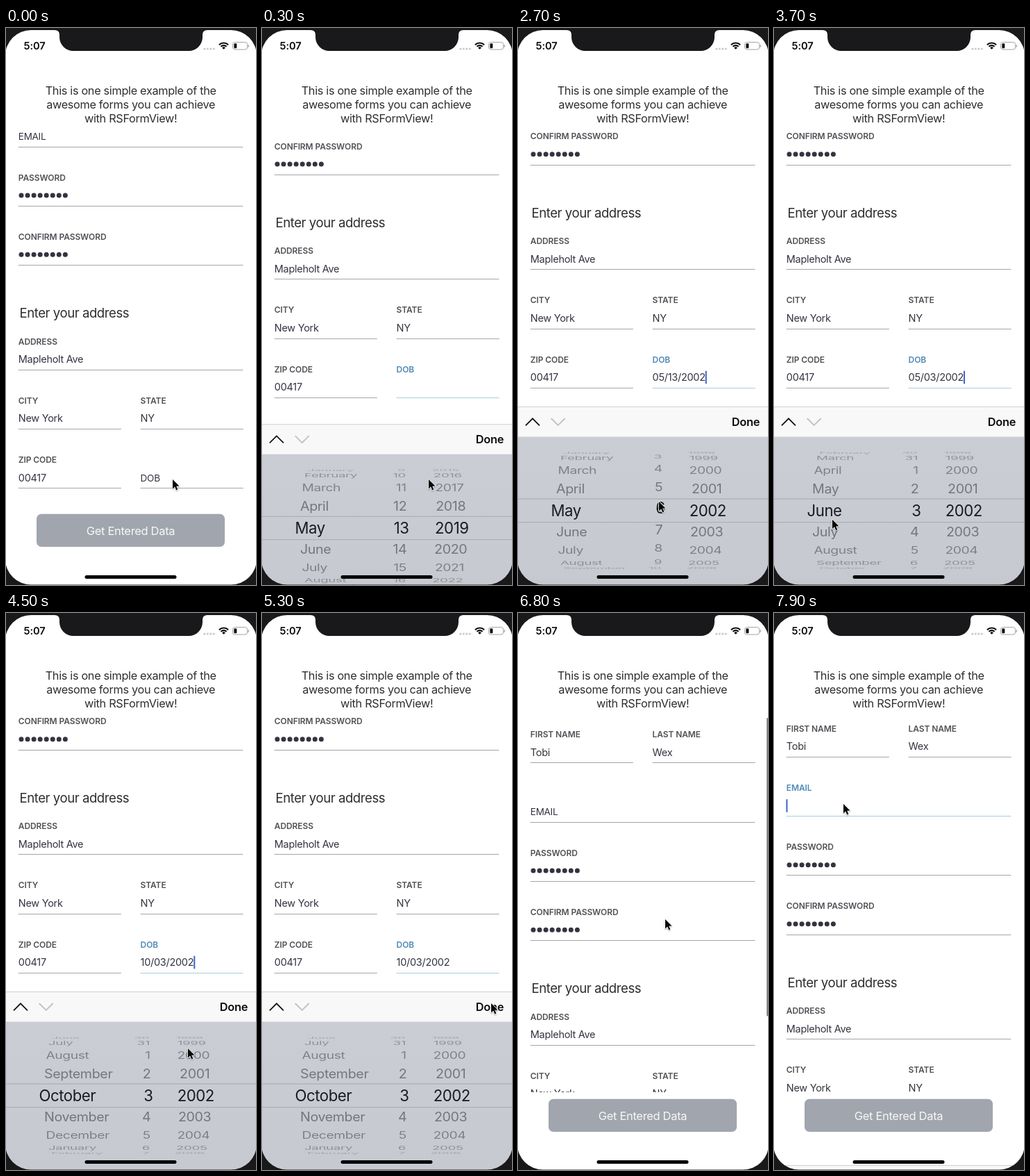
An HTML page with a canvas that plays this animation: 360 by 802 pixels, repeating every 8000 ms.

```html
<!DOCTYPE html>
<html lang="en">
<head>
<meta charset="utf-8">
<title>Form with date picker</title>
<style>
html, body { margin: 0; width: 100%; height: 100%; overflow: hidden; background: #fff; }
canvas { display: block; width: 360px; height: 802px; }
</style>
</head>
<body>
<canvas id="stage"></canvas>
<script>
const W = 360, H = 802, LOOP = 8000, STEP = 100;
const canvas = document.getElementById('stage');
const ctx = canvas.getContext('2d');
const dpr = window.devicePixelRatio || 1;
canvas.width = W * dpr;
canvas.height = H * dpr;

const INK = '#33343f', LABEL = '#515157', BLUE = '#4f8ab8', BEZEL = '#19191b';
const MONTHS = ['January', 'February', 'March', 'April', 'May', 'June', 'July',
  'August', 'September', 'October', 'November', 'December'];

// Times of the main actions
const DOB_FOCUS = 86, DOB_DONE = 5405, SCROLL_BACK = 6200, EMAIL_FOCUS = 7886;
const SPIN = 700, GLIDE = 400;
const FLICKS = {
  year: { at: 987, from: 2019, to: 2002 },
  day: { at: 2475, from: 13, to: 3 },
  month: { at: 3650, from: 5, to: 10 }
};

// Stops of the pointer: arrival time, x, y
const STOPS = [
  [0, 240, 650], [800, 273, 642], [1200, 295, 728], [2400, 190, 642], [2700, 203, 682],
  [3500, 82, 740], [3950, 88, 638], [4500, 262, 627], [5000, 330, 562],
  [5800, 205, 404], [6800, 212, 441], [7500, 100, 275]];

const clamp = v => Math.min(1, Math.max(0, v));
const smooth = u => u * u * (3 - 2 * u);
const wrap = (k, n) => ((k % n) + n) % n;
const two = n => String(n).padStart(2, '0');

// Critically damped spring, 0 to 1
function spring(ms) {
  if (ms <= 0) return 0;
  const w = ms * 0.0183;
  return 1 - (1 + w) * Math.exp(-w);
}

// Underdamped swing, 1 to 0, with one visible overshoot after 600 ms
function bounce(ms) {
  if (ms <= 0) return 1;
  const w = Math.PI * ms / 600, k = 0.847;
  return Math.exp(-k * w) * (Math.cos(w) + k * Math.sin(w));
}

function spun({ at, from, to }, t) {
  return to + (from - to) * (1 - clamp((t - at) / SPIN)) ** 3;
}

function settled({ at, from, to }, t) {
  return t >= at + SPIN ? to : from;
}

function dobText(t) {
  const { year, month, day } = FLICKS;
  if (t < year.at + SPIN) return '';
  return `${two(settled(month, t))}/${two(settled(day, t))}/${settled(year, t)}`;
}

function pointerAt(t) {
  let [last, x, y] = STOPS[0];
  for (const [arrive, nx, ny] of STOPS.slice(1)) {
    const leave = Math.max(last, arrive - GLIDE);
    const u = smooth(clamp((t - leave) / (arrive - leave)));
    x += (nx - x) * u;
    y += (ny - y) * u;
    last = arrive;
  }
  return [x, y];
}

function text(str, x, y, size, color, { weight = 400, align = 'left', track = -0.02 } = {}) {
  ctx.font = `${weight} ${size}px Inter, "Liberation Sans", sans-serif`;
  ctx.letterSpacing = `${track * size}px`;
  ctx.textAlign = align;
  ctx.fillStyle = color;
  ctx.fillText(str, x, y + size * 0.36);
}

function rect(x, y, w, h, color, r = 0) {
  ctx.fillStyle = color;
  ctx.beginPath();
  ctx.roundRect(x, y, w, h, r);
  ctx.fill();
}

function dot(x, y, r, color) {
  ctx.fillStyle = color;
  ctx.beginPath();
  ctx.arc(x, y, r, 0, Math.PI * 2);
  ctx.fill();
}

function chevron(x, y, rise, color) {
  ctx.strokeStyle = color;
  ctx.lineWidth = 1.8;
  ctx.beginPath();
  ctx.moveTo(x - 10, y);
  ctx.lineTo(x, y - rise);
  ctx.lineTo(x + 10, y);
  ctx.stroke();
}

function clipRects(...boxes) {
  ctx.beginPath();
  for (const box of boxes) ctx.rect(...box);
  ctx.clip();
}

function field(label, value, x, y, w, focus = false, caret = false) {
  const mid = y + 25.7;
  if (value || focus) {
    text(label, x, y, 12, focus ? BLUE : LABEL, { weight: 600, track: -0.008 });
  } else {
    text(label, x, mid + 0.5, 13.5, INK);
  }
  if (value === '*') {
    for (let i = 0; i < 8; i++) dot(x + 4.2 + i * 9.05, mid, 3.5, INK);
  } else {
    text(value, x, mid, 14.5, INK);
  }
  if (caret) {
    const end = value ? ctx.measureText(value).width : -0.3;
    rect(x + end, mid - 9.2, 2, 18.5, '#3c62cf');
  }
  rect(x, Math.round(y + 40.5), w, 1, focus ? '#a6cddd' : '#a5a5a9');
}

function drawForm(t, scroll) {
  const blink = wrap(t - 450, 1000) < 500;
  const dob = t >= DOB_FOCUS && t < DOB_DONE;
  const email = t >= EMAIL_FOCUS;
  const half = 148, full = 323.5, left = 17.8, right = 193.6;
  const row = i => 166.5 + i * 85.2 - scroll;
  const lower = i => 572.8 + i * 85.2 - scroll;
  ctx.save();
  clipRects([0, 149.5, W, 540.5]);
  field('FIRST NAME', 'Tobi', left, row(0), half);
  field('LAST NAME', 'Wex', right, row(0), half);
  field('EMAIL', '', left, row(1), full, email, email);
  field('PASSWORD', '*', left, row(2), full);
  field('CONFIRM PASSWORD', '*', left, row(3), full);
  text('Enter your address', 19.5, 532.2 - scroll, 18.6, '#2e2e32', { track: -0.025 });
  field('ADDRESS', 'Mapleholt Ave', left, lower(0), full);
  field('CITY', 'New York', left, lower(1), half);
  field('STATE', 'NY', right, lower(1), half);
  field('ZIP CODE', '00417', left, lower(2), half);
  field('DOB', dobText(t), right, lower(2), half, dob, dob && blink);
  ctx.globalAlpha = clamp(Math.min((t - SCROLL_BACK) / 100, (7500 - t) / 400));
  rect(358, 151 + Math.max(0, scroll) * 0.82, 2, 438 + Math.min(0, scroll), '#858587', 1);
  ctx.restore();
}

// One pass over the rows of a rotating column
function wheelRows(name, pos, x, align, picked) {
  const mid = Math.round(pos);
  for (let k = mid - 4; k <= mid + 4; k++) {
    const a = (k - pos) * 0.382;
    if (Math.abs(a) > 1.56) continue;
    const c = Math.cos(a), near = 1 - 0.092 * (1 - c);
    const color = picked ? '#1b1b1e' : `rgba(0,0,0,${0.18 + 0.26 * c})`;
    ctx.save();
    ctx.translate(180, 694.7 + 83 * Math.sin(a));
    ctx.scale(near, near * Math.max(c, 0.18));
    text(name(k), x, 0, picked ? 22.2 : 19.8, color, { align });
    ctx.restore();
  }
}

function wheel(name, pos, x, pickedX, align) {
  ctx.save();
  clipRects([0, 588, W, 90], [0, 711.5, W, 92]);
  wheelRows(name, pos, x, align, false);
  ctx.restore();
  ctx.save();
  clipRects([0, 678, W, 33.5]);
  wheelRows(name, pos, pickedX, align, true);
  ctx.restore();
}

function drawPicker(t, shown) {
  if (shown < 0.001) return;
  ctx.save();
  ctx.translate(0, (1 - shown) * (H - 545));
  rect(0, 545, W, 44, '#f8f8f8');
  rect(0, 545, W, 1, '#cfcfd1');
  chevron(21, 572.3, 10, '#111');
  chevron(57.7, 562, -10, '#c2c2c5');
  text('Done', 348.3, 567.3, 16.3, '#0c0c0c', { weight: 600, align: 'right', track: -0.01 });
  const shade = ctx.createLinearGradient(0, 589, 0, H);
  shade.addColorStop(0, '#cbcdd5');
  shade.addColorStop(1, '#c7c9d1');
  rect(0, 588.5, W, 214, shade);
  wheel(k => MONTHS[wrap(k - 1, 12)], spun(FLICKS.month, t), -125.8, -132.5, 'left');
  wheel(k => String(wrap(k - 1, 31) + 1), spun(FLICKS.day, t), 28.5, 31.5, 'right');
  wheel(String, spun(FLICKS.year, t), 92.3, 93.3, 'center');
  rect(0, 677.5, W, 1, '#a6a8af');
  rect(0, 711.2, W, 1, '#a6a8af');
  ctx.restore();
}

function drawStatus() {
  const black = '#0b0b0b', gray = '#a3a3a5';
  text('5:07', 25.6, 25.8, 14.7, black, { weight: 600, track: -0.01 });
  for (let i = 0; i < 4; i++) dot(285.8 + i * 4.5, 30, 1.6, '#c9c9cb');
  ctx.strokeStyle = black;
  for (const [r, width] of [[9.3, 2.2], [5.7, 2.2], [1.7, 3.4]]) {
    ctx.lineWidth = width;
    ctx.beginPath();
    ctx.arc(313.5, 30.8, r, Math.PI * 1.25, Math.PI * 1.75);
    ctx.stroke();
  }
  ctx.strokeStyle = gray;
  ctx.lineWidth = 1;
  ctx.beginPath();
  ctx.roundRect(326.5, 20.5, 21, 10.5, 3);
  ctx.stroke();
  rect(328.3, 22.2, 4, 7.1, black, 1.2);
  rect(348.6, 24, 1.4, 3.8, gray, 0.7);
}

function drawBezel() {
  ctx.fillStyle = BEZEL;
  ctx.beginPath();
  ctx.rect(0, 0, W, H);
  ctx.roundRect(-1, 3, 362, 798.5, 37);
  ctx.fill('evenodd');
  ctx.beginPath();
  ctx.moveTo(70, 0);
  ctx.lineTo(70, 3);
  ctx.quadraticCurveTo(77, 3, 77, 10);
  ctx.arcTo(77, 33, 100, 33, 20);
  ctx.arcTo(283, 33, 283, 10, 20);
  ctx.lineTo(283, 10);
  ctx.quadraticCurveTo(283, 3, 290, 3);
  ctx.lineTo(290, 0);
  ctx.fill();
}

function drawPointer(x, y) {
  ctx.save();
  ctx.translate(x, y);
  ctx.scale(0.94, 0.94);
  ctx.lineJoin = 'round';
  ctx.lineWidth = 1.6;
  ctx.strokeStyle = '#fff';
  ctx.fillStyle = '#050505';
  const arrow = new Path2D('M0 0V14.3L3.3 11.3 5.6 16.5 7.8 15.5 5.6 10.5 10.1 10.2Z');
  ctx.shadowColor = 'rgba(0,0,0,.3)';
  ctx.shadowBlur = 2 * dpr;
  ctx.shadowOffsetY = dpr;
  ctx.stroke(arrow);
  ctx.shadowColor = 'transparent';
  ctx.fill(arrow);
  ctx.restore();
}

function draw(t) {
  const dobShown = spring(t - DOB_FOCUS) - spring(t - DOB_DONE);
  const shown = dobShown + spring(t - EMAIL_FOCUS);
  const scroll = 121.5 * bounce(t - SCROLL_BACK) + 144.5 * dobShown;
  ctx.setTransform(dpr, 0, 0, dpr, 0, 0);
  rect(0, 0, W, H, '#fff');
  drawStatus();
  ['This is one simple example of the', 'awesome forms you can achieve', 'with RSFormView!']
    .forEach((line, i) => text(line, 179.7, 90 + i * 20, 16.3, '#2e2e32', { align: 'center' }));
  drawForm(t, scroll);
  rect(44, 699.7, 271, 47.3, '#a1a5ae', 7);
  text('Get Entered Data', 179.5, 723.8, 16.5, '#f6f7f8', { align: 'center' });
  drawPicker(t, shown);
  rect(113.5, 788, 132, 5, '#050505', 2.5);
  drawBezel();
  drawPointer(...pointerAt(t));
}

// Motion advances in steps; a small lead absorbs display latency
const start = performance.now();
function tick() {
  const t = Math.floor((performance.now() - start + 20) / STEP) * STEP;
  draw(t % LOOP);
  requestAnimationFrame(tick);
}
tick();
</script>
</body>
</html>
```
